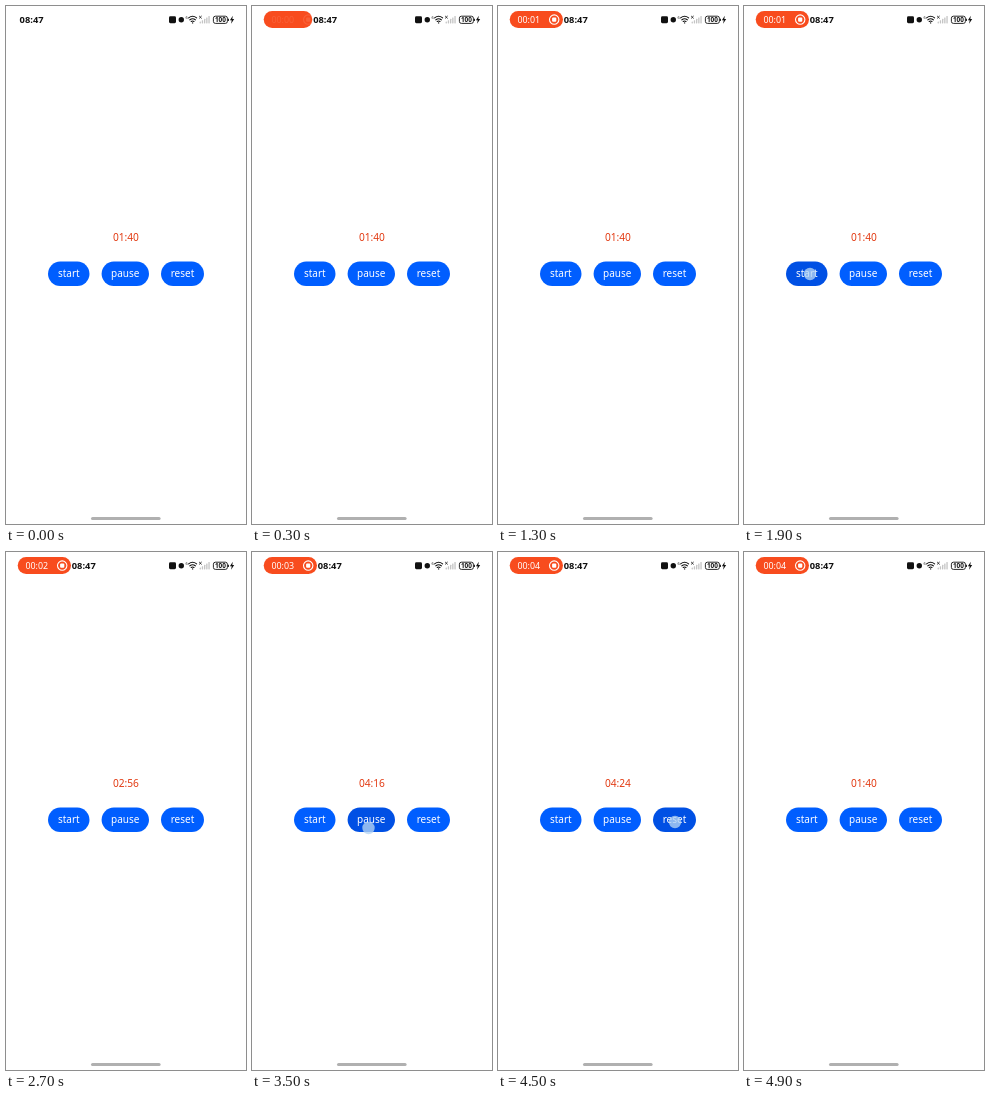
Recreate the animation shown at these times as an HTML page. Size 240 px wide and 518 px high, loop 5 s.

```html
<!DOCTYPE html>
<html lang="en">
<head>
<meta charset="utf-8">
<title>Timer</title>
<style>
  html, body { margin: 0; width: 100%; height: 100%; overflow: hidden; background: #fff; }
  svg { display: block; width: 240px; height: 518px; }
  text { font-family: "Noto Sans", "Open Sans", sans-serif; font-weight: 500; }
  .mid { text-anchor: middle; }
  .label { font-size: 10px; fill: #fff; }
  #clock { font-size: 9.3px; font-weight: 600; fill: #111; }
  #count { font-size: 10.2px; fill: #e23a12; }
  #elapsed { font-size: 8.9px; fill: #fff; }
</style>
</head>
<body>
<svg viewBox="0 0 240 518">
  <rect width="240" height="518" fill="#fff"/>

  <g id="pill">
    <rect id="pillBody" x="11.7" y="5" width="53.3" height="17" rx="8.5" fill="#f84c1e"/>
    <g id="pillInfo">
      <text id="elapsed" x="19.4" y="16.8">00:00</text>
      <circle cx="56.2" cy="13.6" r="4.7" fill="none" stroke="#fff" stroke-width="1.1"/>
      <rect x="54.1" y="11.5" width="4.2" height="4.2" rx="1" fill="#fff"/>
    </g>
  </g>
  <text id="clock" x="13.6" y="17">08:47</text>

  <g id="status" fill="#111">
    <rect x="163" y="10.2" width="7" height="7" rx="1.4"/>
    <circle cx="175.3" cy="13.7" r="2.7"/>
    <text x="179.4" y="13" font-size="4" font-weight="700">6</text>
    <g fill="none" stroke="#111" stroke-width="1.1" stroke-linecap="round">
      <path d="M182.6 11.9Q186.6 8.7 190.6 11.9M183.9 13.8Q186.6 11.7 189.3 13.8M185.2 15.5Q186.6 14.5 188 15.5"/>
      <path d="M193.4 10.2l2 2m0-2l-2 2" stroke-width=".8"/>
    </g>
    <circle cx="186.6" cy="16.9" r=".7"/>
    <g id="bars" fill="#c4c4c4"></g>
    <rect x="207.4" y="10.2" width="14" height="7.2" rx="2" fill="none" stroke="#111" stroke-width=".9"/>
    <rect x="222.1" y="12.5" width=".9" height="2.6" rx=".4"/>
    <text class="mid" x="214.4" y="16.2" font-size="6.4" style="font-weight:700">100</text>
    <path d="M226.8 9.8L223.9 14.3H225.7L225.1 17.8L228.2 13H226.3Z"/>
  </g>

  <text id="count" class="mid" x="119.9" y="234.8">01:40</text>
  <g id="buttons"></g>
  <circle id="touch" r="6.2" fill="#b5d5f3" fill-opacity=".78" opacity="0"/>
  <rect x="85" y="511" width="69.6" height="3" rx="1.5" fill="#b0b0b0"/>
</svg>
<script>
const LOOP = 5000, STEP = 100, START_VALUE = 100;
const $ = id => document.getElementById(id);

function add(parent, tag, attrs, text) {
  const el = document.createElementNS("http://www.w3.org/2000/svg", tag);
  for (const key in attrs) el.setAttribute(key, attrs[key]);
  if (text) el.textContent = text;
  return parent.appendChild(el);
}

const clamp = v => Math.max(0, Math.min(1, v));
const pad = n => String(n).padStart(2, "0");
const mmss = s => pad(Math.floor(s / 60)) + ":" + pad(s % 60);

// Each button with its touch point and press interval
const buttons = [
  { text: "start", x: 42, w: 41.5, tx: 66, ty: 268, down: 1780, up: 1940 },
  { text: "pause", x: 95.6, w: 47.4, tx: 116.5, ty: 276, down: 3380, up: 3580 },
  { text: "reset", x: 155, w: 43, tx: 177, ty: 270, down: 4380, up: 4560 }
];
const [start, pause, reset] = buttons;

for (const b of buttons) {
  b.el = add($("buttons"), "rect", { x: b.x, y: 255.6, width: b.w, height: 24.4, rx: 12.2 });
  add($("buttons"), "text", { class: "label mid", x: b.x + b.w / 2, y: 271.2 }, b.text);
}
for (let i = 0; i < 5; i++) {
  const h = 1.8 + i * 1.4;
  add($("bars"), "rect", { x: 193.6 + i * 2.2, y: 17.4 - h, width: 1.3, height: h, rx: .4 });
}

const pressed = (b, t, fade) => clamp((t - b.down) / 100) * clamp(1 - (t - b.up) / fade);

function counter(t) {
  if (t < start.up || t >= reset.up) return START_VALUE;
  return START_VALUE + Math.floor((Math.min(t, pause.up) - start.up) / 10);
}

function draw(t) {
  const p = clamp((t - 50) / 450);
  const grow = 1 - (1 - p) ** 3;
  $("pill").setAttribute("opacity", clamp(p * 4));
  $("pillBody").setAttribute("width", 53.3 * grow);
  $("pillInfo").setAttribute("opacity", clamp(p * 2 - 1));
  $("clock").setAttribute("x", 13.6 + 52.2 * grow);
  $("elapsed").textContent = mmss(Math.floor(t / 1000));
  $("count").textContent = mmss(counter(t));

  let touch = 0;
  for (const b of buttons) {
    const k = pressed(b, t, 220);
    b.el.setAttribute("fill", `rgb(0,${94 - 14 * k},${255 - 27 * k})`);
    const dot = pressed(b, t, 100);
    if (dot > 0) {
      touch = dot;
      $("touch").setAttribute("cx", b.tx);
      $("touch").setAttribute("cy", b.ty);
    }
  }
  $("touch").setAttribute("opacity", touch);
}

const begin = performance.now();
function tick() {
  const t = (performance.now() - begin) % LOOP;
  draw(Math.floor(t / STEP) * STEP);
  requestAnimationFrame(tick);
}
tick();
</script>
</body>
</html>
```
